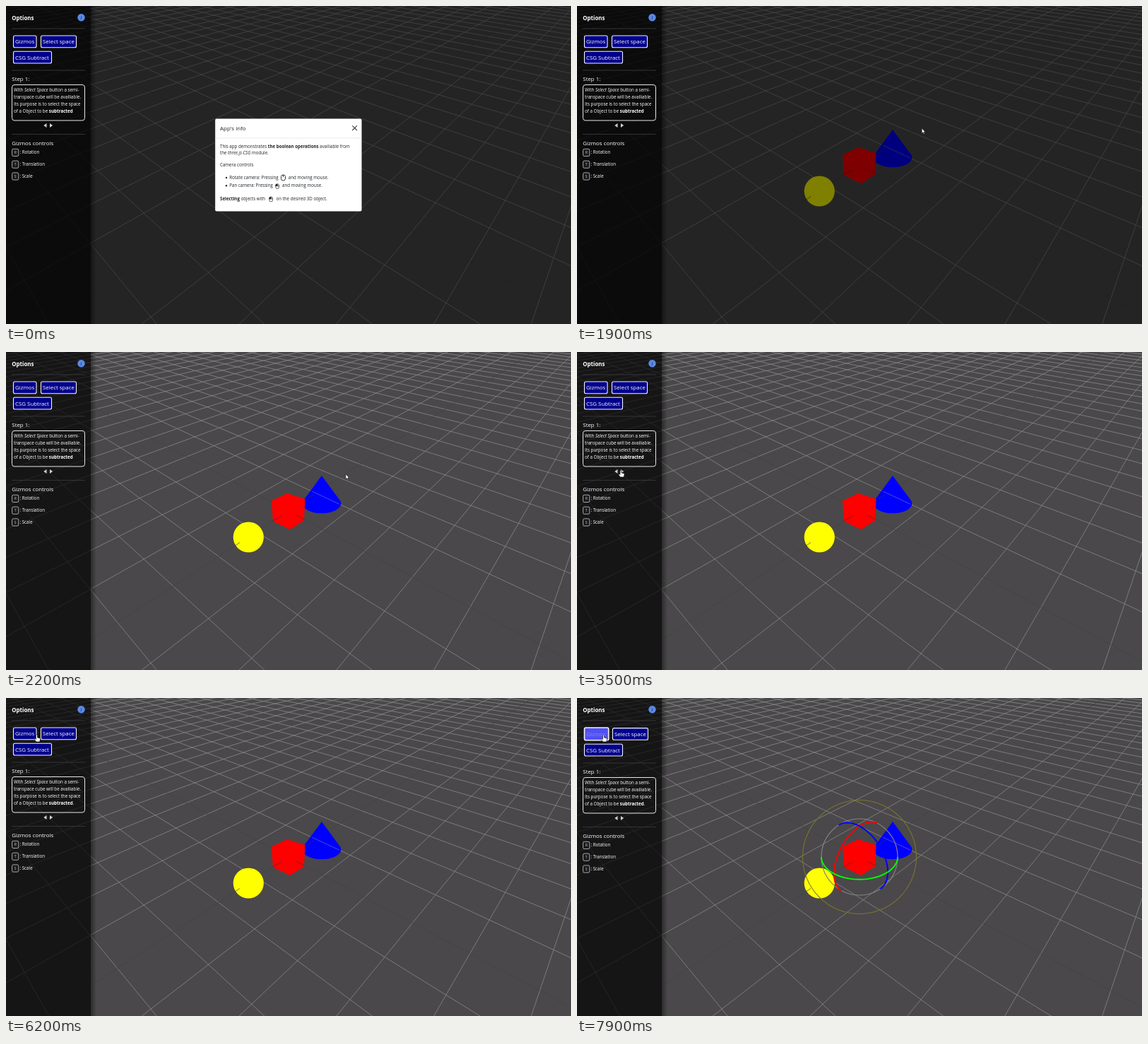
Animation, 800 px wide and 450 px high, one loop 8000 ms. Source, as an HTML page:

```html
<!DOCTYPE html>
<html lang="en">
<head>
<meta charset="utf-8">
<title>CSG demo</title>
<style>
html, body { margin: 0; width: 100%; height: 100%; overflow: hidden; background: #4a484a; }
svg { display: block; width: 100vw; height: 100vh; }
text { font-family: "Open Sans", "Noto Sans", sans-serif; font-size: 6.25px; fill: #fff; white-space: pre; }
.h { font-size: 7.9px; }
.b { font-weight: 700; }
.i { font-style: italic; }
.btn { fill: #00008b; stroke: #f4f4f8; stroke-width: 1.1; }
.rule { stroke: #343236; stroke-width: 1; }
#modal text { fill: #212529; font-size: 6.2px; }
#modal .h { font-size: 8px; }
</style>
</head>
<body>
<svg viewBox="0 0 800 450" preserveAspectRatio="none">
  <defs>
    <linearGradient id="shade">
      <stop offset="0" stop-color="#000" stop-opacity=".4"/>
      <stop offset="1" stop-color="#000" stop-opacity="0"/>
    </linearGradient>
    <g id="mouse" fill="#fff" stroke="#222" stroke-width=".9">
      <rect x="-3" y="-4" width="6" height="8" rx="2.8"/>
      <path d="M0-4V-1" fill="none"/>
    </g>
    <g id="click" fill="#fff" stroke="#222" stroke-width=".7">
      <rect x="-2.2" y="-2.6" width="4.8" height="6.6" rx="2.2"/>
      <path d="M-2.2 .2H2.6M.2-2.6V.2" fill="none"/>
      <path d="M-2-1.8L0-2.5V0H-2.2Z" fill="#222"/>
    </g>
  </defs>

  <rect width="800" height="450" fill="#4a484a"/>
  <path id="grid" fill="none" stroke="#8a8a8a" stroke-width=".8"/>
  <path id="axes" fill="none" stroke="#444" stroke-width=".8"/>

  <path d="M447 175L473.6 211A27.4 14 0 1 1 420.4 211Z" fill="#00f"/>
  <path d="M398 200L423.5 208L422 238.5L402 251L378 239.5L376 210.5Z" fill="#f00"/>
  <circle cx="343.3" cy="262" r="21.6" fill="#ff0"/>
  <path id="cuts" fill="none" stroke="#333" stroke-width=".8" stroke-opacity=".8"/>
  <path id="overCone" fill="none" stroke="#88a" stroke-width=".7" stroke-opacity=".75"/>

  <g id="gizmo" fill="none" stroke-width="1.9">
    <circle cx="400" cy="225" r="80.5" stroke="#78772c" stroke-width="1.1"/>
    <circle cx="400" cy="225" r="54" stroke="#858385" stroke-width="1.2"/>
    <path id="ringX" stroke="#f00"/>
    <path id="ringZ" stroke="#00f"/>
    <path id="ringY" stroke="#0f0"/>
  </g>

  <rect id="backdrop" width="800" height="450"/>

  <rect x="120" width="8" height="450" fill="url(#shade)"/>
  <rect width="120" height="450" fill="#000" fill-opacity=".7"/>
  <text class="h b" x="8.3" y="19.5">Options</text>
  <circle cx="106.5" cy="16.3" r="5.2" fill="#5a8ae6"/>
  <text class="i" x="105.5" y="18.8" style="fill:#101c40;font-size:7px">i</text>
  <path class="rule" d="M8 32H112"/>
  <rect id="gBtn" class="btn" x="10.5" y="42" rx="2"/>
  <text id="gText" class="h" x="13" y="53.4">Gizmos</text>
  <g id="select">
    <rect class="btn" x="49.5" y="42" width="50" height="16.7" rx="2"/>
    <text class="h" x="52" y="53.4">Select space</text>
  </g>
  <g id="rest">
    <rect class="btn" x="10.5" y="64.3" width="54" height="16.7" rx="2"/>
    <text class="h" x="13" y="75.9">CSG Subtract</text>
    <path class="rule" d="M8 91H112M8 181.5H112"/>
    <text class="h" x="8.3" y="106.3">Step 1:</text>
    <rect x="8.5" y="111.5" width="103" height="50.5" rx="3.5" fill="none" stroke="#e8e8e8"/>
    <text x="11" y="121.3">With <tspan class="i">Select Space</tspan> button a semi-</text>
    <text x="11" y="131.3">transpace cube will be availiable.</text>
    <text x="11" y="141.3">Its purpose is to select the space</text>
    <text x="11" y="151.3">of a Object to be <tspan class="b">subtracted</tspan><tspan id="dot">.</tspan></text>
    <path d="M57.5 166V172L53.3 169ZM62 166V172L66.2 169Z" fill="#d0d0d0"/>
    <text class="h" x="8.3" y="196.6">Gizmos controls</text>
    <g id="keys"></g>
  </g>

  <g id="modal">
    <rect x="296.2" y="159.4" width="207.4" height="131.2" rx="2" fill="#fff"/>
    <path d="M296.2 187H503.6" stroke="#e3e5e8" stroke-width=".8"/>
    <text class="h" x="303" y="176.4">App's info</text>
    <path d="M490.3 169.3L497 176M497 169.3L490.3 176" stroke="#444" stroke-width="1.1"/>
    <text x="303" y="200.5">This app demonstrates <tspan class="b">the boolean operations</tspan> availiable from</text>
    <text x="303" y="210.4">the <tspan class="i">three.js CSG</tspan> module.</text>
    <text x="303" y="227.3">Camera controls</text>
    <circle cx="312" cy="243" r="1.2" fill="#212529"/>
    <text x="316.3" y="245.2">Rotate camera: Pressing</text>
    <use href="#mouse" x="392.5" y="243"/>
    <text x="399.8" y="245.2">and moving mouse.</text>
    <circle cx="312" cy="254.2" r="1.2" fill="#212529"/>
    <text x="316.3" y="256.4">Pan camera: Pressing</text>
    <use href="#click" x="384" y="254.5"/>
    <text x="391" y="256.4">and moving mouse.</text>
    <text x="303" y="274.8"><tspan class="b">Selecting</tspan> objects with</text>
    <use href="#click" x="375" y="272.8"/>
    <text x="382.5" y="274.8">on the desired 3D object.</text>
  </g>

  <g id="cursor">
    <path id="arrow" d="M0 0V7.2L1.7 5.7L2.9 8.3L4 7.8L2.9 5.2H5Z" fill="#fff" stroke="#111" stroke-width=".6"/>
    <path id="hand" d="M-1 .8Q0-.6 1 .8V4L4.3 4.8Q5.4 5.2 5.1 6.6L4.2 10H-.8L-3.2 6.4Q-3.2 5.2-2 5.6L-1 6.6Z" fill="#fff" stroke="#111" stroke-width=".7"/>
    <path id="beam" d="M-1.4-3.5H1.4M0-3.5V3.5M-1.4 3.5H1.4" fill="none" stroke="#ddd" stroke-width=".8"/>
  </g>
</svg>
<script>
const LOOP = 8000, CLOSE = 1664, HOVER = 6300, PRESS = 7000, PICK = 7300;
const $ = id => document.getElementById(id);
const set = (id, attrs) => { for (const k in attrs) $(id).setAttribute(k, attrs[k]); };
const show = (id, on) => set(id, { visibility: on ? 'visible' : 'hidden' });
const clamp = x => Math.max(0, Math.min(1, x));
const ramp = (t, from, length) => clamp((t - from) / length);
const mix = (a, b, k) => a + (b - a) * k;

// Camera at unit distance from the origin, looking down at it
const F = 482.5, TILT = 36 * Math.PI / 180, SIN = Math.sin(TILT), COS = Math.cos(TILT);
const A = .67, B = .742, CELL = .1292;

const depth = (i, j) => 1 + CELL * (i * B - j * A) * COS;
function point(i, j) {
  const x = CELL * (i * A + j * B), z = CELL * (i * B - j * A), d = depth(i, j);
  return (400 + F * x / d).toFixed(2) + ' ' + (225 - F * z * SIN / d).toFixed(2);
}
const segment = (i0, j0, i1, j1) => `M${point(i0, j0)}L${point(i1, j1)}`;

// A grid line, cut off just in front of the camera
function line(n, alongI) {
  const far = alongI ? 90 : -90, slope = CELL * COS * (alongI ? B : -A);
  const base = alongI ? depth(0, n) : depth(n, 0);
  const near = (.25 - base) / slope;
  return alongI ? segment(near, n, far, n) : segment(n, near, n, far);
}

function ring(from, to, place) {
  let d = '';
  for (let k = 0; k <= 40; k++) {
    const a = mix(from, to, k / 40) * Math.PI / 180;
    const [x, y, z] = place(Math.cos(a), Math.sin(a));
    d += `${k ? 'L' : 'M'}${(400 + 54 * x).toFixed(2)} ${(225 - 54 * (y * COS + z * SIN)).toFixed(2)}`;
  }
  return d;
}

function build() {
  let d = '';
  for (let n = -45; n <= 45; n++) if (n) d += line(n, true) + line(n, false);
  set('grid', { d });
  set('axes', { d: line(0, true) + line(0, false) });
  set('cuts', { d: 'M390 232L377.5 239M411 231L422.5 237M331 269.5L324.5 274M436.5 201.5L424 210' });
  set('overCone', { d: segment(1, -.12, 1, .7) });

  const turnX = Math.atan(B * COS / SIN) * 180 / Math.PI;
  const turnZ = Math.atan(A * COS / SIN) * 180 / Math.PI;
  set('ringX', { d: ring(-turnX, 180 - turnX, (c, s) => [-A * c, s, -B * c]) });
  set('ringZ', { d: ring(-turnZ, 180 - turnZ, (c, s) => [B * c, s, -A * c]) });
  set('ringY', { d: ring(180, 360, (c, s) => [c, 0, s]) });

  $('keys').innerHTML = ['Rotation', 'Translation', 'Scale'].map((name, n) => {
    const y = 207.3 + n * 16.8;
    return `<rect x="8.6" y="${y - 5}" width="9.2" height="10.2" rx="1.8" fill="#1c1a1d" stroke="#ccc" stroke-width=".8"/>
      <text x="13.2" y="${y + 1.9}" text-anchor="middle" style="font-size:5px;fill:#ccc">${name[0]}</text>
      <text x="19.4" y="${y + 2.1}">: ${name}</text>`;
  }).join('');
}

// time, x, y
const path = [
  [100, 592, 264], [900, 490, 173], [1700, 490, 173], [1950, 488, 173], [2150, 488, 173],
  [2550, 330, 168], [3350, 62, 167], [4300, 62, 167], [4900, 61, 195], [5400, 61, 195],
  [6100, 43.5, 52], [6400, 43.5, 52], [6900, 37.5, 52], [8000, 37.5, 52]
];

function pointer(t) {
  let n = 1;
  while (n < path.length - 1 && t > path[n][0]) n++;
  const [t0, x0, y0] = path[n - 1], [t1, x1, y1] = path[n];
  const k = ramp(t, t0, t1 - t0), e = k * k * (3 - 2 * k);
  return [mix(x0, x1, e), mix(y0, y1, e)];
}

function shape(t) {
  if (t < 900) return 'arrow';
  if (t < CLOSE + 150) return 'hand';
  if (t < 3200) return 'arrow';
  if (t < 4450) return 'hand';
  if (t < 4750) return 'arrow';
  if (t < 5550) return 'beam';
  return t < 5950 ? 'arrow' : 'hand';
}

function draw(t) {
  const slide = 1 - (1 - ramp(t, CLOSE, 300)) ** 2;
  set('modal', { opacity: 1 - ramp(t, CLOSE, 150), transform: `translate(0 ${-22 * slide})` });
  set('backdrop', { opacity: .5 * (1 - ramp(t, CLOSE + 270, 150)) });
  show('dot', t >= 4000);

  const hover = ramp(t, HOVER, 300), shift = t >= HOVER ? 1 : 0;
  const fill = [0, 0, 139].map((c, n) => Math.round(mix(c, [80, 80, 245][n], hover)));
  set('gBtn', { width: 32.5 + 1.7 * shift, height: 16.7 + shift });
  $('gBtn').style.fill = `rgb(${fill})`;
  $('gBtn').style.strokeWidth = 1.1 + .5 * shift;
  set('gText', { transform: `translate(${.5 * shift} ${.6 * shift})` });
  $('gText').style.fill = t >= PRESS ? '#8c8cc8' : '#fff';
  set('select', { transform: `translate(${shift} ${.6 * shift})` });
  set('rest', { transform: `translate(0 ${shift})` });
  show('gizmo', t >= PICK);

  const kind = shape(t);
  for (const id of ['arrow', 'hand', 'beam']) show(id, t >= 100 && id === kind);
  set('cursor', { transform: `translate(${pointer(t)})` });
}

build();
const start = performance.now();
function tick() {
  draw((performance.now() - start) % LOOP);
  requestAnimationFrame(tick);
}
tick();
</script>
</body>
</html>
```
